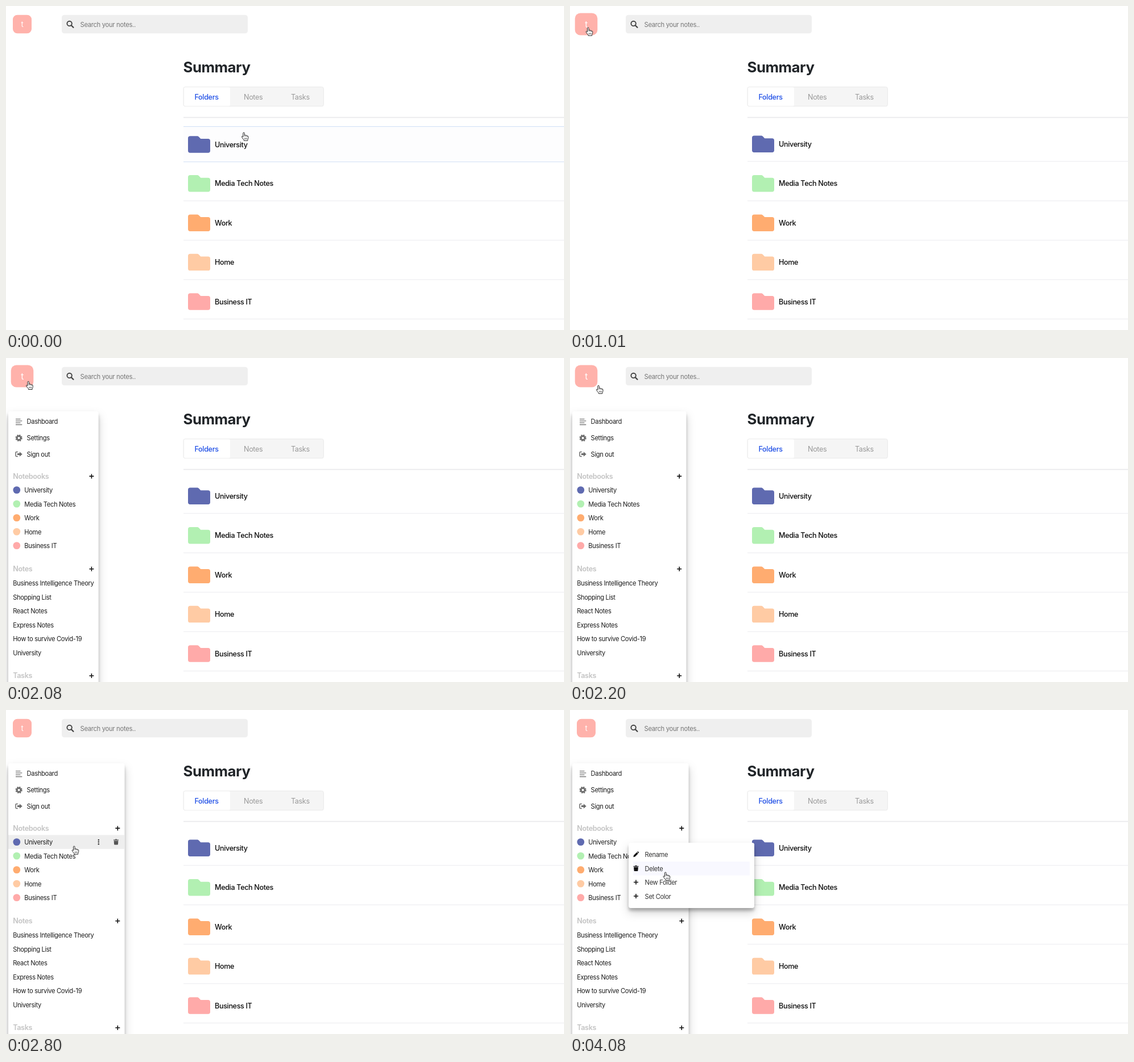
An HTML page that plays this animation: 981 by 571 pixels, repeating every 4410 ms.

```html
<!DOCTYPE html>
<html lang="en">
<head>
<meta charset="utf-8">
<title>Notes dashboard</title>
<style>
  html, body { margin: 0; width: 100%; height: 100%; overflow: hidden; background: #fff; }
  svg { display: block; width: 981px; height: 571px; }
  text { font-family: Inter, "Open Sans", sans-serif; letter-spacing: -.028em; white-space: pre; }
  .row { font-size: 12.6px; font-weight: 450; fill: #0c0c0c; }
  .small { font-size: 11.1px; fill: #1b1b1b; }
  .head { font-size: 12.6px; font-weight: 600; fill: #c3c3c3; }
</style>
</head>
<body>
<svg id="stage" viewBox="0 0 981 571" xmlns="http://www.w3.org/2000/svg"></svg>
<script>
const LOOP = 4410;
const OPEN_AT = 1915, OPEN_MS = 350, MENU_AT = 3150;
const PANEL_X = 4, PANEL_W = 204.5;

const notebooks = [
  ['University', '#5f6ab0'],
  ['Media Tech Notes', '#b2f0b2'],
  ['Work', '#ffac70'],
  ['Home', '#ffcba4'],
  ['Business IT', '#ffaaa9'],
];
const notes = ['Business Intelligence Theory', 'Shopping List', 'React Notes',
  'Express Notes', 'How to survive Covid-19', 'University'];

const text = (x, y, str, cls, extra = '') => `<text x="${x}" y="${y}" class="${cls}" ${extra}>${str}</text>`;
const rect = (x, y, w, h, fill, extra = '') =>
  `<rect x="${x}" y="${y}" width="${w}" height="${h}" fill="${fill}" ${extra}/>`;
const line = (d, color, width, extra = '') =>
  `<path d="${d}" fill="none" stroke="${color}" stroke-width="${width}" ${extra}/>`;
const at = (x, y, body, id = '') => `<g ${id && `id="${id}"`} transform="translate(${x} ${y})">${body}</g>`;

const plus = line('M-4 0H4M0 -4V4', '#111', 1.6);
const trash = color => `<path fill="${color}" d="M-4.5 -4H-1.7L-1.2 -5H1.2L1.7 -4H4.5V-2.8H-4.5ZM-3.9 -2.1H3.9L3.4 4.2Q3.3 5 2.5 5H-2.5Q-3.3 5 -3.4 4.2Z"/>`;
const pencil = '<path fill="#111" d="M-4.6 4.7L-4 1.6L1.4 -3.8L3.8 -1.4L-1.6 4ZM2 -4.4L2.8 -5.1Q3.3 -5.4 3.8 -5L4.9 -3.9Q5.3 -3.4 4.9 -2.9L4.3 -2.1Z"/>';
const signOut =
  line('M-1.6 -4H-4Q-5.4 -4 -5.4 -2.6V2.6Q-5.4 4 -4 4H-1.6', '#6a6a6a', 1.5) +
  '<path fill="#6a6a6a" d="M-2.6 -1.6H1.4V-4.2L6.3 0L1.4 4.2V1.6H-2.6Z"/>';
const gear =
  '<circle r="3.4" fill="none" stroke="#6a6a6a" stroke-width="2.6"/>' +
  '<circle r="5.1" fill="none" stroke="#6a6a6a" stroke-width="2" stroke-dasharray="2.4 1.605"/>';
const folder = color => `<path fill="${color}" d="M324 228.5H336.3Q337.7 228.5 338.7 229.5L342.3 233.2H355.3Q359 233.2 359 236.9V254.3Q359 258 355.3 258H323.7Q320 258 320 254.3V232.2Q320 228.5 324 228.5Z"/>`;

const header =
  at(28.5, 32, rect(-16.5, -16.3, 33, 32.6, '#ffb2ab', 'rx="8"') +
    text(0, 4.8, 't', '', 'font-size="13" fill="#fff" text-anchor="middle"'), 'avatar') +
  rect(98, 15.7, 327, 32.6, '#efefef', 'rx="4.5"') +
  '<circle cx="111.6" cy="30.9" r="4.2" fill="none" stroke="#444" stroke-width="1.9"/>' +
  line('M114.6 34L118.4 37.8', '#444', 2.3, 'stroke-linecap="round"') +
  text(130.5, 37, 'Search your notes..', '', 'font-size="11.25" fill="#777"');

const summary =
  text(311.6, 117, 'Summary', '', 'font-size="25.8" font-weight="700" fill="#212529" style="letter-spacing:-.02em"') +
  rect(312, 142.7, 246.3, 34, '#f5f5f5', 'rx="3" stroke="#e8e8e8" stroke-width=".9"') +
  rect(313, 143.3, 81, 32.9, '#fff', 'rx="2"') +
  text(331.5, 164.5, 'Folders', 'row', 'style="font-weight:550;fill:#1f4fe6"') +
  text(418, 164.5, 'Notes', 'row', 'style="font-weight:400;fill:#999"') +
  text(501, 164.5, 'Tasks', 'row', 'style="font-weight:400;fill:#999"') +
  rect(312, 195.6, 669, 1.7, '#e9e9ec');

const folderRows = notebooks.map(([name, color], i) => at(0, i * 69.45,
  (i ? '' : `<g id="rowHover">${rect(312, 212, 669, 61.8, '#fdfdfe')}${
    line('M312 211.7H981M312 273.9H981', '#cfdff6', 1)}</g>`) +
  `<g ${i ? '' : 'id="rowLine"'}>${line('M312 273.9H981', '#ebebee', 1)}</g>` +
  folder(color) + text(367, 247.9, name, 'row'), 'folder' + i)).join('');

const notebookRows = notebooks.map(([name, color], i) => {
  const y = 232.8 + i * 24.5;
  return `<circle cx="18.8" cy="${y - .2}" r="6.4" fill="${color}"/>` + text(32.3, y + 4.2, name, 'small');
}).join('');

const panel = `<g id="panel">
  ${rect(PANEL_X, 94, PANEL_W, 560, '#fff', 'id="panelBox" rx="4" filter="url(#shadow)"')}
  <g clip-path="url(#panelClip)">
    ${line('M17 107.6H25.5M17 110.9H28.3M17 114.2H25.5M17 117.5H28.3', '#777', 1.3)}
    ${text(36.6, 116.2, 'Dashboard', 'small')}
    ${at(22.6, 141, gear)}${text(36.6, 145, 'Settings', 'small')}
    ${at(22.4, 169.5, signOut)}${text(36.6, 173.6, 'Sign out', 'small')}
    <g id="itemHover">${rect(PANEL_X, 220.3, PANEL_W, 24.5, '#eee')}
      ${[-3.7, 0, 3.7].map(d => `<circle cx="162.8" cy="${232.6 + d}" r="1.25" fill="#333"/>`).join('')}
      ${at(193.5, 232.6, trash('#555'))}</g>
    ${text(12.2, 212.7, 'Notebooks', 'head')}
    ${notebookRows}
    ${text(12.2, 376.2, 'Notes', 'head')}
    ${notes.map((name, i) => text(12.2, 401.1 + i * 24.5, name, 'small')).join('')}
    ${text(12.2, 564.4, 'Tasks', 'head')}
    <g id="adders">${[208.4, 371.8, 560].map(y => at(0, y, plus)).join('')}</g>
  </g></g>`;

const menuItems = [['Rename', pencil], ['Delete', trash('#111')], ['New Folder', plus], ['Set Color', plus]];
const menu = `<g id="menu">
  ${rect(103, 234, 221, 115, '#fff', 'rx="4" filter="url(#shadow)"')}
  ${rect(111, 0, 205, 24.5, '#f8f8ff', 'id="menuHover"')}
  ${menuItems.map(([name, icon], i) => at(116, 255 + i * 24.5,
    at(0, -.5, icon) + text(15.6, 4.2, name, 'small', 'style="fill:#333"'))).join('')}</g>`;

const cursor = `<g id="cursor">
  <path id="arrow" d="M0 0V10.7L2.4 8.4L4 12.1L5.9 11.3L4.3 7.7H7.6Z" fill="#000" stroke="#fff" stroke-width=".8"/>
  <g id="hand" stroke="#1a1a1a" stroke-width=".95" stroke-linejoin="round">
    <path fill="#fff" d="M-1.5 1.2Q-1.5 0 -.3 0Q1 0 1 1.2V5Q1.2 4.3 2.2 4.4Q3.2 4.5 3.3 5.4Q4 4.8 4.9 5.1Q5.6 5.4 5.6 6.2Q7.6 5.6 7.7 7.4V9.5Q7.5 11.5 6.6 12.6V14.2H0V13Q-1.5 11.5 -3.6 8.2Q-4.3 7 -3.4 6.6Q-2.6 6.3 -1.5 7.8Z"/>
    <path fill="none" stroke-width=".7" d="M1 5V7M3.3 5.4V7.2M5.6 6.2V7.6M1.3 9.4V12M3.2 9.4V12M5.1 9.4V12"/>
  </g></g>`;

document.getElementById('stage').innerHTML = `<defs>
  <clipPath id="panelClip"><rect id="clipBox" x="${PANEL_X}" y="94" width="0" height="500"/></clipPath>
  <filter id="shadow" filterUnits="userSpaceOnUse" x="-40" y="50" width="440" height="660" color-interpolation-filters="sRGB">
    <feDropShadow in="SourceGraphic" dx="0" dy="8" stdDeviation="8" flood-opacity=".19" result="far"/>
    <feDropShadow in="SourceGraphic" dx="0" dy="4.9" stdDeviation="2.45" flood-opacity=".23" result="near"/>
    <feMerge><feMergeNode in="far"/><feMergeNode in="near"/></feMerge>
  </filter></defs>` + header + summary + folderRows + panel + menu + cursor;

const $ = id => document.getElementById(id);
const show = (id, on) => $(id).setAttribute('display', on ? 'inline' : 'none');
const clamp = v => Math.min(1, Math.max(0, v));
const ramp = (t, from, ms) => clamp((t - from) / ms);
const linear = p => p;
const easeIn = p => p * p;
const easeOut = p => 1 - (1 - p) ** 2;
const easeInOut = p => p * p * (3 - 2 * p);

// CSS "ease": cubic-bezier(.25, .1, .25, 1)
function cssEase(x) {
  let lo = 0, hi = 1;
  for (let i = 0; i < 24; i++) {
    const s = (lo + hi) / 2, r = 1 - s;
    if (.75 * s * r * r + .75 * s * s * r + s ** 3 < x) lo = s; else hi = s;
  }
  const r = 1 - lo;
  return .3 * lo * r * r + 3 * lo * lo * r + lo ** 3;
}

// Pointer tip: time, x, y and the easing used to arrive there
const track = [
  [0, 418.3, 223], [20, 418.3, 223], [150, 204, 236, easeOut], [300, 204, 236],
  [830, 50, 40, easeInOut], [1010, 32, 38, easeOut], [1330, 32, 38], [1340, 33, 38],
  [1535, 33, 38], [1570, 34.3, 38], [1920, 34.3, 38], [2200, 50, 48, easeIn],
  [2440, 110, 171], [2800, 120, 240, easeOut], [2900, 120, 240], [2990, 120, 238],
  [3435, 120, 238], [3570, 133, 261, easeIn], [3930, 166, 285.5, easeOut],
  [3980, 166, 285.5], [4080, 168, 286, easeOut], [LOOP, 168, 286],
];

function pointer(t) {
  const i = Math.max(1, track.findIndex(k => k[0] >= t));
  const [t0, x0, y0] = track[i - 1], [t1, x1, y1, ease = linear] = track[i];
  const p = ease(ramp(t, t0, t1 - t0));
  return [x0 + (x1 - x0) * p, y0 + (y1 - y0) * p];
}

function draw(t) {
  const [x, y] = pointer(t);
  const menuOpen = t >= MENU_AT, panelOpen = t >= OPEN_AT;

  const onFolder = x > 312;
  show('rowHover', onFolder);
  show('rowLine', !onFolder);
  $('folder0').setAttribute('transform', `translate(0 ${onFolder ? .8 : 0})`);

  const grow = easeInOut(ramp(t, 865, 140)) - easeInOut(ramp(t, 2215, 150));
  $('avatar').setAttribute('transform', `translate(28.5 32) scale(${1 + .2 * grow})`);

  const width = PANEL_W * cssEase(ramp(t, OPEN_AT, OPEN_MS));
  show('panel', panelOpen);
  $('panelBox').setAttribute('width', width);
  $('clipBox').setAttribute('width', width);
  $('adders').setAttribute('transform', `translate(${PANEL_X + width - 12.2} 0)`);
  const onItem = panelOpen && !menuOpen && y > 220 && y < 245;
  show('itemHover', onItem);

  const item = Math.floor((y - 242.5) / 24.5);
  show('menu', menuOpen);
  show('menuHover', item >= 0);
  $('menuHover').setAttribute('y', 242.5 + Math.max(0, item) * 24.5);

  const onAvatar = x < 49 && y < 50;
  const onLink = panelOpen && y > 98 && y < 184;
  const hand = onFolder || onAvatar || (menuOpen ? item > 0 : onItem || onLink) || (t > 2190 && t < 2215);
  show('hand', hand);
  show('arrow', !hand);
  $('cursor').setAttribute('transform', `translate(${x} ${y})`);
}

const start = performance.now();
function tick() {
  draw((performance.now() - start) % LOOP);
  requestAnimationFrame(tick);
}
tick();
</script>
</body>
</html>
```
